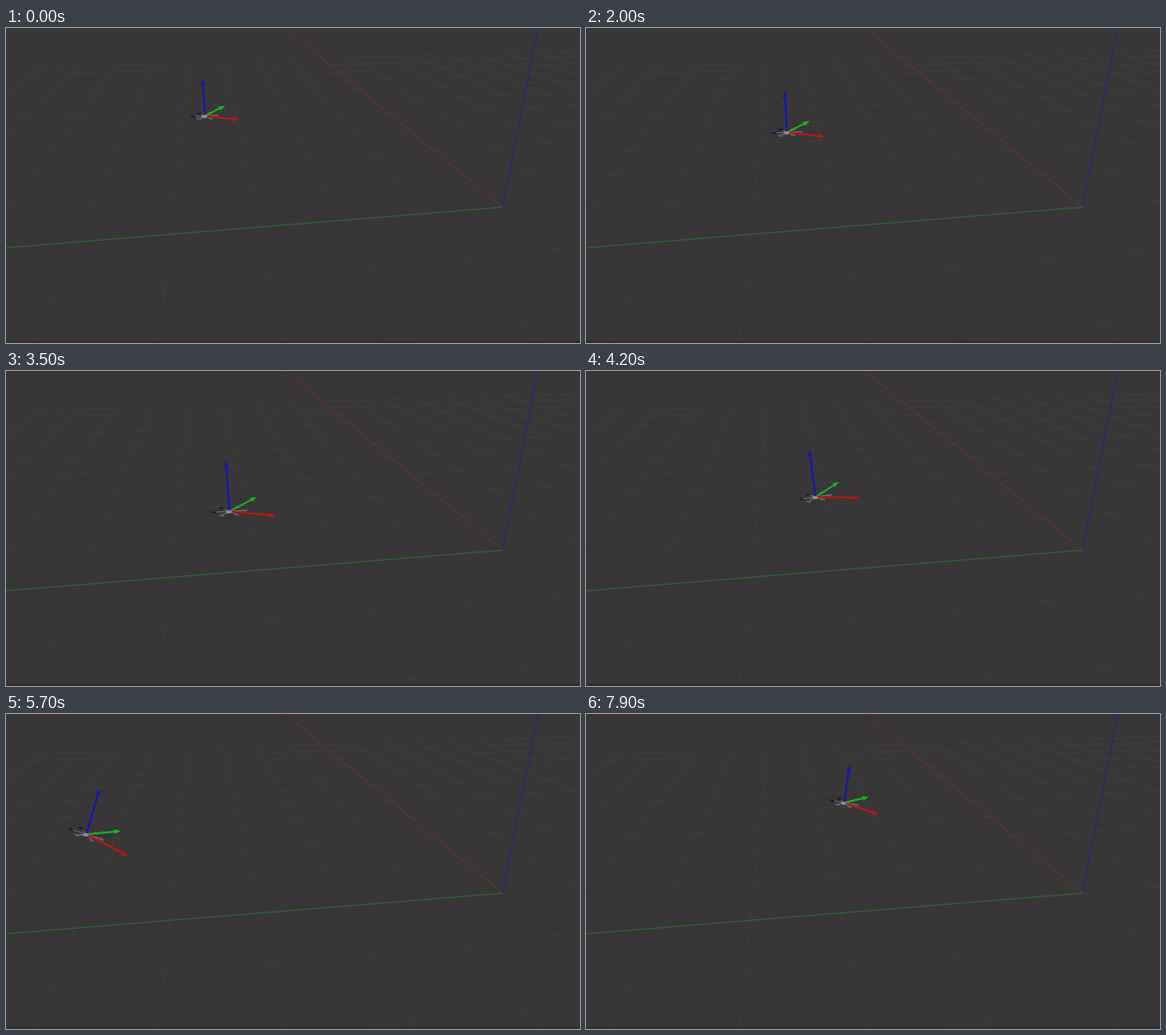
Write an HTML page with a canvas that moves like this. It is 600 by 330 pixels and loops after 8000 ms.

```html
<!DOCTYPE html>
<html lang="en">
<head>
<meta charset="utf-8">
<title>Drone pose view</title>
<style>
  html, body { margin: 0; width: 100%; height: 100%; overflow: hidden; background: #383637; }
  canvas { display: block; }
</style>
</head>
<body>
<canvas id="view" width="600" height="330"></canvas>
<script>
const ctx = document.getElementById('view').getContext('2d');
const LOOP = 8000, STEP = 100;

// Waypoints of the flight: time, x, y (the outer ones lie beyond the loop)
const PATH = [
  [-500, 213, 92], [600, 203, 92], [1200, 206, 90], [1800, 208, 101],
  [2800, 221, 146], [3600, 235, 146], [4200, 240, 132], [4600, 228, 128],
  [5400, 115, 123], [5700, 84, 126], [6300, 150, 119], [7000, 294, 99],
  [7300, 311, 97], [7900, 270, 93], [8400, 295, 93]
];

// Smooth curve through unevenly timed waypoints
function position(t) {
  let i = 0;
  while (i < PATH.length - 2 && t >= PATH[i + 1][0]) i++;
  const a = PATH[i], b = PATH[i + 1];
  const before = PATH[Math.max(i - 1, 0)], after = PATH[Math.min(i + 2, PATH.length - 1)];
  const span = b[0] - a[0], u = (t - a[0]) / span;
  return [1, 2].map(j => {
    const p = a[j], q = b[j];
    const m = (q - before[j]) / (b[0] - before[0]) * span;
    const n = (after[j] - p) / (after[0] - a[0]) * span;
    return p + u * (m + u * (3 * (q - p) - 2 * m - n + u * (2 * (p - q) + m + n)));
  });
}

// The drone leans in the direction of its sideways acceleration
function lean(t) {
  const x = dt => position(t + dt)[0];
  return -0.06 + 0.0036 * (x(-450) + x(450) - 2 * x(0));
}

function line(x1, y1, x2, y2, color, width = 1) {
  ctx.strokeStyle = color;
  ctx.lineWidth = width;
  ctx.beginPath();
  ctx.moveTo(x1, y1);
  ctx.lineTo(x2, y2);
  ctx.stroke();
}

function disc(x, y, rx, ry, angle, color) {
  ctx.fillStyle = color;
  ctx.beginPath();
  ctx.ellipse(x, y, rx, ry, angle, 0, 7);
  ctx.fill();
}

function drawWorld() {
  const horizon = -74, vanishX = 202, vanishFar = 3690, grid = '#3f3e3f';
  ctx.fillStyle = '#383637';
  ctx.fillRect(0, 0, 600, 330);

  const depth = n => 1 / (0.00329 + n * 0.00053);
  for (let n = -4; n <= 10; n++) {
    const d = depth(n);
    line(0, horizon + d, 600, horizon + d * (1 - 600 / vanishFar), grid, 0.8);
  }
  for (let k = -10; k <= 10; k++) {
    const slope = (490 - 133 * k) / 404, far = depth(10);
    const top = far * (1 - vanishX / vanishFar) / (1 + slope * far / vanishFar);
    line(vanishX + slope * top, horizon + top, vanishX + slope * 404, 330, grid, 0.8);
  }
  line(292, 0, 519, 187.5, '#722e2e');
  line(0, 230.3, 519, 187.8, '#2f6630');
  line(519, 187.5, 556, 0, '#272784', 1.1);
  ctx.fillStyle = '#302e2f';
  ctx.fillRect(0, 328, 600, 2);
}

function arrow(x, y, dx, dy, color) {
  const len = Math.hypot(dx, dy), ux = dx / len, uy = dy / len;
  const tx = x + dx, ty = y + dy, bx = tx - ux * 7, by = ty - uy * 7;
  line(x, y, bx, by, color, 2);
  ctx.fillStyle = color;
  ctx.beginPath();
  ctx.moveTo(tx, ty);
  ctx.lineTo(bx - uy * 2.5, by + ux * 2.5);
  ctx.lineTo(bx + uy * 2.5, by - ux * 2.5);
  ctx.fill();
}

function drawDrone(t) {
  const [x, y] = position(t), tilt = lean(t);
  const size = 16 + 0.26 * y;   // lower on screen is nearer
  const axis = (dx, dy) => [dx * size, dy * size];
  const red = axis(0.9, 0.16 + 1.1 * tilt);
  const green = axis(0.57 + 0.6 * tilt, -0.24 + 0.6 * tilt);
  const blue = axis(tilt, -0.98);

  for (let k = 0; k < 6; k++) {
    const a = (k + 0.5) * Math.PI / 3, r = 0.29 * Math.cos(a), g = 0.29 * Math.sin(a);
    const px = x + r * red[0] + g * green[0], py = y + r * red[1] + g * green[1];
    const back = r < -0.01;
    line(x, y, px, py, back ? '#66667f' : '#7d7b7c');
    disc(px, py, 2.8, 1, Math.atan2(red[1], red[0]), back ? '#1b1b3a' : '#605f66');
  }
  arrow(x, y, ...green, '#18b11d');
  arrow(x, y, ...red, '#b81616');
  arrow(x, y, ...blue, '#1717b0');
  disc(x - 0.5, y + 0.5, 3, 1.8, 0, '#8d8b91');
}

function frame() {
  const t = Math.floor(performance.now() % LOOP / STEP) * STEP;
  drawWorld();
  drawDrone(t);
  requestAnimationFrame(frame);
}
frame();
</script>
</body>
</html>
```
